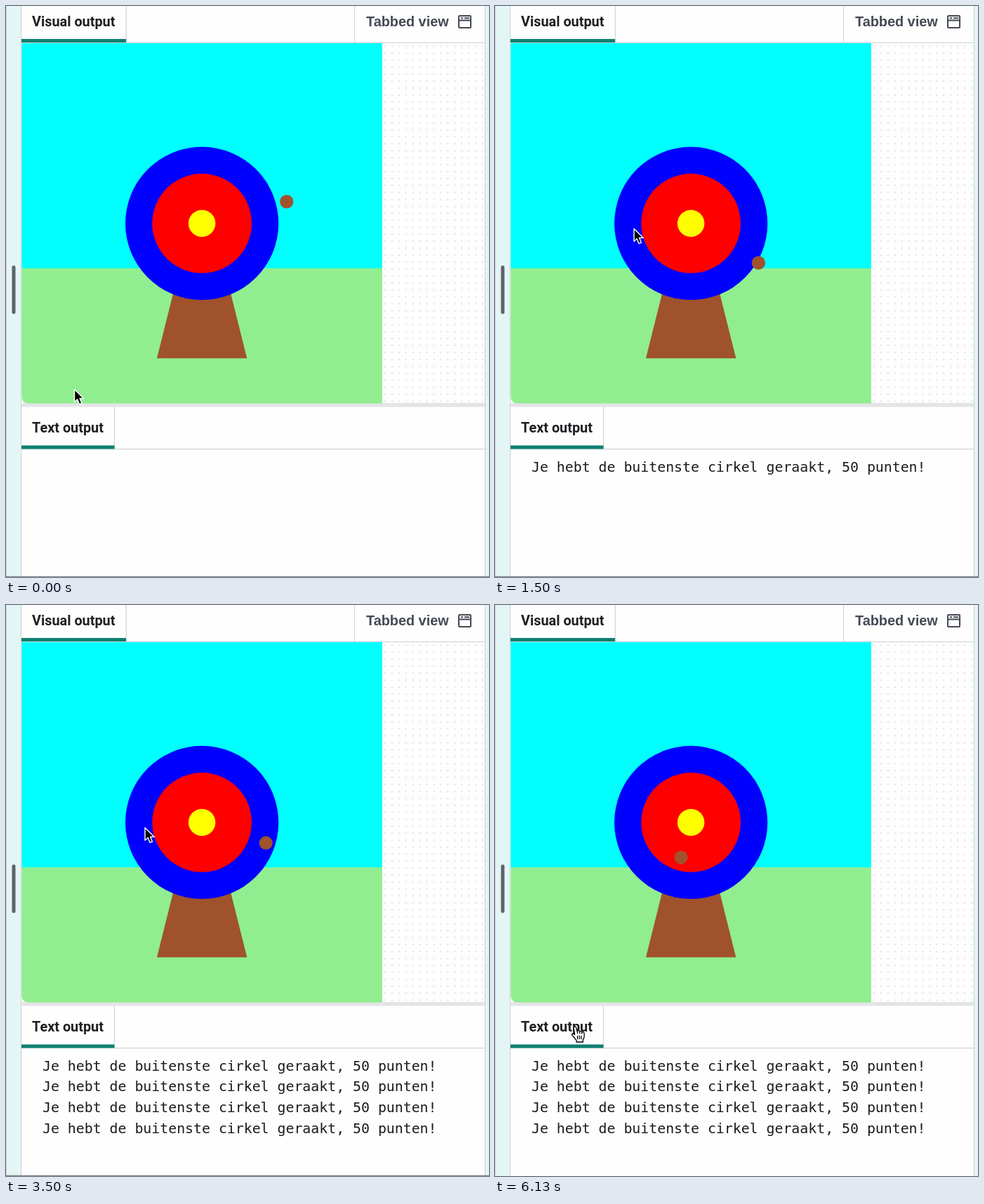
Write an HTML page that moves like this. It is 688x814 px and loops after 6.27 s.

```html
<!DOCTYPE html>
<html lang="en">
<head>
<meta charset="utf-8">
<title>Target practice</title>
<style>
  html, body { margin: 0; width: 100%; height: 100%; overflow: hidden; background: #fff; }
  svg { display: block; }
  text { white-space: pre; }
  .tab { font: bold 19.85px Roboto, sans-serif; fill: #1f2023; }
  .view { font: bold 19.85px "Liberation Sans", Arial, sans-serif; fill: #444a55; }
  .log { font: 19.85px "DejaVu Sans Mono", monospace; fill: #1c1c1e; }
  .rule { fill: none; stroke: #d3d4d6; stroke-width: 1.2; }
  .accent { fill: #0d8070; }
</style>
</head>
<body>
<svg width="688" height="814" viewBox="0 0 688 814">
  <defs>
    <pattern id="dots" x="535" y="52.5" width="9.92" height="9.92" patternUnits="userSpaceOnUse">
      <circle cx="5" cy="5" r="1.25" fill="#e2e3e6"/>
    </pattern>
  </defs>

  <!-- Panels -->
  <rect width="688" height="814" fill="#e4f5f5"/>
  <rect x="22" width="660" height="814" fill="#fefefe"/>
  <path class="rule" d="M.5 0V814M21.7 0V814M682.5 0V814"/>
  <rect x="8.5" y="370" width="5" height="69" rx="2.5" fill="#5d646c"/>
  <rect x="535" y="53" width="147" height="513" fill="url(#dots)"/>
  <path class="rule" d="M22 52.4H682M171.3 0V52M496.5 0V52M22 631.6H682M154.4 571V631"/>
  <rect x="22" y="566" width="660" height="5.5" fill="#e3e4e6"/>
  <rect class="accent" x="22" y="47" width="149" height="5"/>
  <rect class="accent" x="22" y="626.5" width="132.5" height="5"/>
  <text class="tab" x="37" y="28.5">Visual output</text>
  <text class="tab" x="37" y="608">Text output</text>
  <text class="view" x="513" y="28.5">Tabbed view</text>
  <g fill="none" stroke="#444a55" stroke-width="2">
    <rect x="645" y="14" width="17" height="17" rx="1"/>
    <path d="M645 20.5H662M648 17.3H651M653 17.3H660"/>
  </g>

  <!-- Drawing, in sketch units of 400 by 400 -->
  <g transform="translate(22.4 53) scale(1.2835)">
    <path d="M0 0H400V250H0Z" fill="#0ff"/>
    <path d="M0 250H400V400H8Q0 400 0 392Z" fill="#90ee90"/>
    <path d="M150 350L200 150L250 350Z" fill="#a0522d"/>
    <circle cx="200" cy="200.2" r="85" fill="#00f"/>
    <circle cx="200" cy="200.2" r="55.2" fill="#f00"/>
    <circle cx="200" cy="200.2" r="15" fill="#ff0"/>
    <circle id="ball" r="7.5" fill="#a0522d"/>
  </g>

  <g id="log" class="log"></g>
  <rect id="edge" y="812.8" width="688" height="1.2" fill="#85878b"/>

  <!-- Pointers, each with its hot spot at the origin -->
  <path id="arrow" d="M0 0V18L4.2 14.2L7 21.2L10.4 19.8L7.6 13H13.2Z"
        stroke="#fff" stroke-width="1.4" stroke-linejoin="round"/>
  <g id="hand" stroke="#000" stroke-width="1.3" stroke-linejoin="round" stroke-linecap="round">
    <path fill="#fff" d="M-4 10L-5.5 1.5Q-5.4-.8-3.3-.4Q-2 .1-1.5 2L-.4 6Q.3 4.5 2.3 5.2L3 6.2Q5 5.2 6.3 7.2Q9.3 6.6 9.6 9.4V14Q9.4 16 7.8 18V21.5H-1.5V19Q-4 16.5-5.5 13.9Q-8.5 11.6-8 10.2Q-6.4 8.5-4 11Z"/>
    <path fill="none" d="M-.4 6L.2 9M3 6.2L3.4 9M6.3 7.2V9.5M0 13V17M2.7 13V17M5.4 13V17"/>
  </g>
</svg>
<script>
  const LOOP = 6270, TICK = 100;
  const MESSAGE = "Je hebt de buitenste cirkel geraakt, 50 punten!";
  const $ = id => document.getElementById(id);

  // Random spots the ball jumps between, one every half second
  const spots = [
    [294, 176], [250, 264], [258, 152], [275, 244], [135, 185], [265, 241], [170, 113],
    [271, 223], [177, 216], [161, 125], [293, 135], [262, 147], [189, 239]
  ];
  const hitTime = i => 920 + 835 * i;

  // Where the pointer turns or rests: [time, x, y]
  const stops = [
    [0, 97.5, 546.5], [500, 189, 325.5], [800, 198, 317.5],
    [3600, 198, 317.5], [4150, 110, 645], [4600, 117.5, 601.5]
  ];

  const lines = Array.from({ length: 4 }, (_, i) => {
    const line = document.createElementNS("http://www.w3.org/2000/svg", "text");
    line.setAttribute("x", 52);
    line.setAttribute("y", 663.6 + i * 29.77);
    line.textContent = MESSAGE;
    return $("log").appendChild(line);
  });

  const show = (el, on) => { el.style.display = on ? "" : "none"; };
  const place = (el, x, y) => el.setAttribute("transform", `translate(${x} ${y})`);
  const ease = k => k * k * (3 - 2 * k);

  function pointerAt(t) {
    const next = stops.findIndex(stop => stop[0] > t);
    if (next < 0) return stops.at(-1).slice(1);
    const [t0, x0, y0] = stops[next - 1], [t1, x1, y1] = stops[next];
    const k = ease((t - t0) / (t1 - t0));
    return [x0 + (x1 - x0) * k, y0 + (y1 - y0) * k];
  }

  function draw(time) {
    const t = Math.floor(time / TICK) * TICK;
    place($("ball"), ...spots[Math.min(Math.floor((t + 200) / 500), spots.length - 1)]);
    lines.forEach((line, i) => show(line, t >= hitTime(i)));

    const [x, y] = pointerAt(t);
    const overTab = t > 4000 && y < 626;
    show($("arrow"), !overTab);
    show($("hand"), overTab);
    place($(overTab ? "hand" : "arrow"), x, y);
    show($("edge"), time < 6130);
  }

  function frame() {
    draw(performance.now() % LOOP);
    requestAnimationFrame(frame);
  }
  frame();
</script>
</body>
</html>
```
